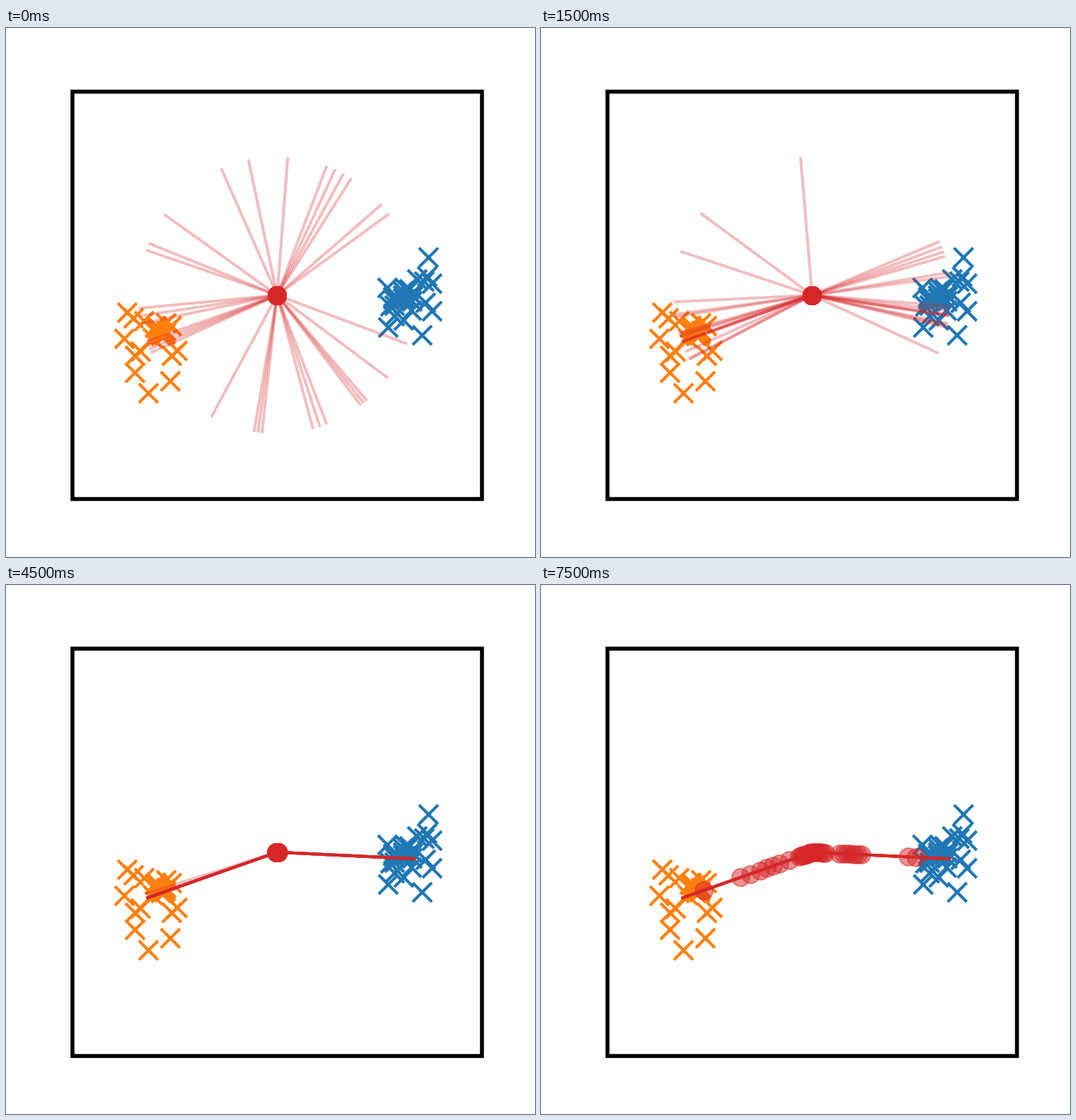
Write a matplotlib script that moves like this. It is 748x748 px and loops after 8 s.

```python
import numpy as np
import matplotlib.pyplot as plt
from matplotlib.animation import FuncAnimation
from matplotlib.patches import Rectangle

SIZE = 748
FRAMES = 16
CENTER = np.array([383.4, 377.8])
REACH = 194
RIGHT, LEFT = -2.8, 199.4  # directions of the two cluster means

# Opening fans of rays: first angle, last angle, count
FANS = [
    (69, 57.6, 4), (41, 36, 2), (-20.5, -36.8, 2), (-49.6, -52.8, 3),
    (-69, -75, 3), (-96.3, -99.6, 3), (85.6, 102, 2), (113.8, 144.4, 2),
    (158, 161, 2), (185.4, 191.8, 3), (199.5, 204.5, 4), (241.6, 241.6, 1),
]


def cloud(rng, outer, mean, spread, count):
    """A few outlying points around a dense random core."""
    return np.vstack([outer, rng.normal(mean, spread, (count, 2))])


rng = np.random.default_rng(4)
blue = cloud(rng, [(597, 324), (595, 351), (602, 361), (539, 367), (602, 400),
                   (540, 423), (588, 434), (562, 413)],
             (570, 380), (14, 12), 17)
orange = cloud(rng, [(171, 402), (180, 410), (167, 439), (182, 463),
                     (190, 457), (182, 487), (201, 516), (232, 499),
                     (242, 456), (234, 463), (195, 414)],
               (218, 426), (8, 9), 15)

start = np.concatenate([np.linspace(*fan) for fan in FANS])
goes_right = (start > -97) & (start < 80)
start = np.where(goes_right, start, start % 360)
goal = np.where(goes_right, RIGHT, LEFT)
offset = np.radians(start - goal)
# Rays below the clusters are drawn in faster than those above
pull = np.where((offset > 0) == goes_right, 0.9, 1.5)

# Final distance of each dot, by rank within its arm
rank = np.where(goes_right, np.cumsum(goes_right), np.cumsum(~goes_right)) - 1
dist = np.where(
    goes_right,
    np.interp(rank, [0, 1, 2, 8, 9, 14], [147, 136, 70, 39, 19, 3]),
    np.interp(rank, [0, 1, 3, 6, 8, 15], [163, 107, 78, 49, 19, 1]))


def directions(step):
    """Slow start far from the goal, exponential approach near it."""
    drive = pull * (0.35 * step + 0.055 * step ** 2)
    turn = np.arctan(np.tan(0.77 * offset) * np.exp(-drive)) / 0.77
    rad = np.radians(goal) + turn
    return np.column_stack([np.cos(rad), -np.sin(rad)])


def growth(step):
    left = FRAMES - 1 - step
    return np.exp(-0.218 * left - 0.086 * left ** 2)


fig = plt.figure(figsize=(SIZE / 72, SIZE / 72), dpi=72, facecolor="white")
ax = fig.add_axes([0, 0, 1, 1])
ax.set(xlim=(0, SIZE), ylim=(SIZE, 0))
ax.axis("off")

for points, color in ((blue, "tab:blue"), (orange, "tab:orange")):
    ax.plot(*points.T, "x", color=color, ms=27, mew=4.17, zorder=2)

rays = [ax.plot([], [], color="tab:red", lw=4, alpha=0.3, zorder=3)[0]
        for _ in start]
dots, = ax.plot([], [], "o", color="tab:red", ms=25, mew=2, alpha=0.5, zorder=4)
ax.add_patch(Rectangle((94, 90), 579, 576, fill=False, ec="black", lw=5.56,
                       zorder=5))


def update(step):
    dirs = directions(step)
    for ray, tip in zip(rays, CENTER + REACH * dirs):
        ray.set_data(*np.transpose([CENTER, tip]))
    dots.set_data(*(CENTER + dirs * (dist * growth(step))[:, None]).T)
    return [*rays, dots]


anim = FuncAnimation(fig, update, frames=FRAMES, interval=500, repeat=True,
                     repeat_delay=0)
plt.show()
```
